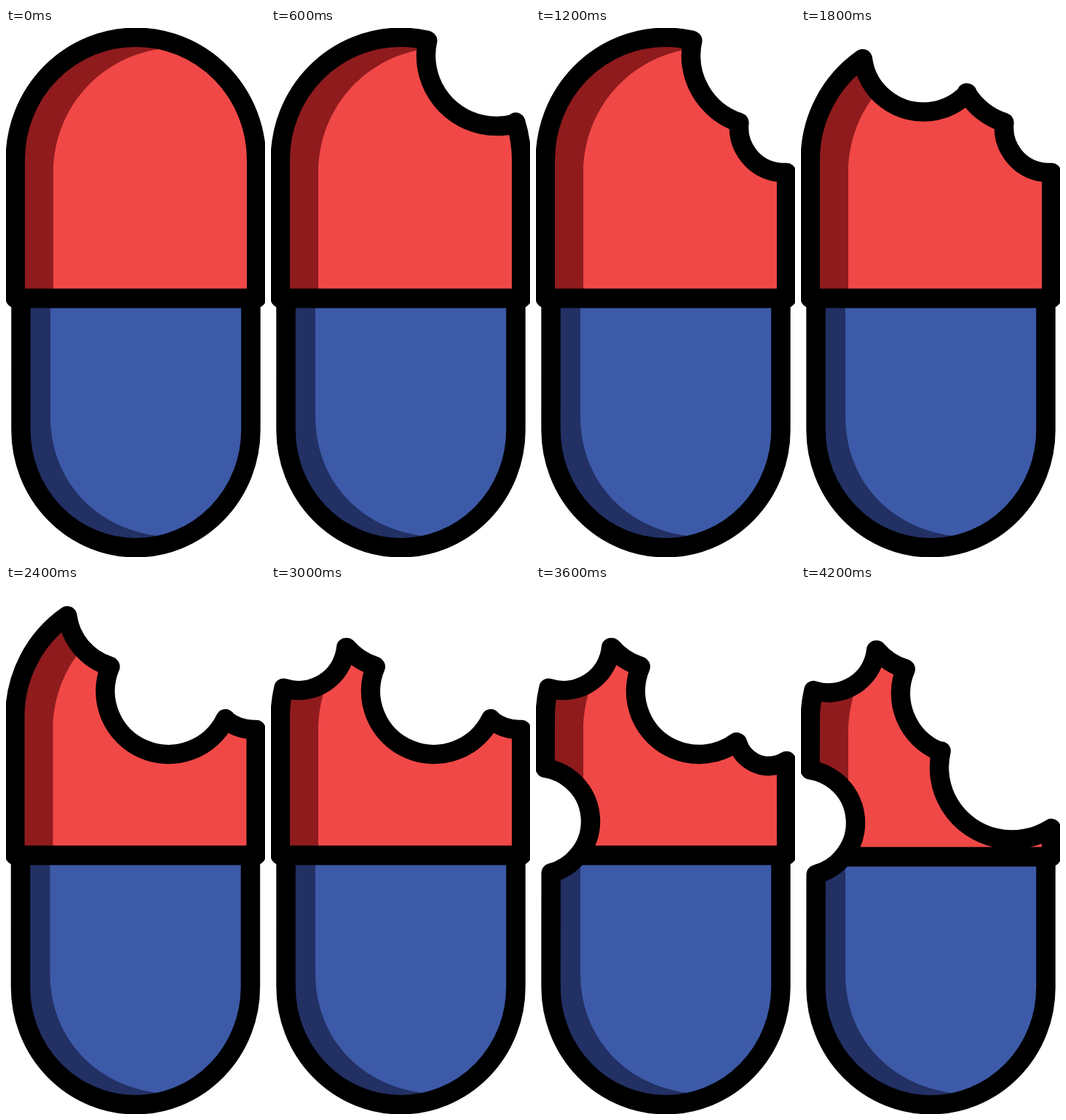
Recreate the animation shown at these times as an HTML page with a canvas. Size 356 by 728 pixels, loop 4.8 s.

```html
<!DOCTYPE html>
<html lang="en">
<head>
<meta charset="utf-8">
<title>Pill being eaten</title>
<style>
  html, body { margin: 0; width: 100%; height: 100%; overflow: hidden; background: #fff; }
  canvas { display: block; }
</style>
</head>
<body>
<canvas id="stage" width="356" height="728"></canvas>
<script>
const ctx = document.getElementById('stage').getContext('2d');
const STEP = 600;
const LINE = 26.5;
const BAND = 372;
const LEFT = 12.75, RIGHT = 344.25;
const CX = (LEFT + RIGHT) / 2, RX = (RIGHT - LEFT) / 2;
const DOME_Y = 181, DOME_RY = 168.25;

// Bite circles: x, y, radius
const shoulder = [310, 38, 97];
const side = [341, 137, 62];
const crown = [168, 31.7, 83.8];
const middle = [224, 146, 87];
const corner = [37.6, 79, 66];
const nibble = [320, 204, 45];
const deep = [290, 248.4, 100];
const waist = [1, 325, 74];

// Each top edge alternates tips and the bites between them
const left = [[18, 142], corner, [104, 86], crown, [143, 112], middle];
const right = [[304, 185], side, [RIGHT, 199]];
const shoulderEnd = [shoulder, [279, 130], side, [RIGHT, 199]];
const poses = [
  { top: [] },
  { top: [[214, 17], shoulder, [335, 130]] },
  { top: [[214, 17], ...shoulderEnd] },
  { top: [[85, 42.5], crown, [228, 89], ...shoulderEnd] },
  { top: [[85, 42.5], crown, [143, 112], middle, ...right], move: [1, -0.5, 0] },
  { top: [...left, ...right] },
  { top: [...left, [276, 217], nibble, [RIGHT, 242]], waist: true },
  { top: [...left, [190, 225], deep, [RIGHT, 333]], waist: true, move: [0.9945, 0, 4] }
];

const domeAngle = ([x, y]) => Math.atan2((y - DOME_Y) / DOME_RY, (x - CX) / RX);
const dome = (p, from, to) => p.ellipse(CX, DOME_Y, RX, DOME_RY, 0, from, to);

function bite(p, [cx, cy, r], a, b) {
  const angle = ([x, y]) => Math.atan2(y - cy, x - cx);
  p.arc(cx, cy, r, angle(a), angle(b), true);
}

const notch = [58, BAND];

function redPath({ top, waist: bitten }) {
  const p = new Path2D();
  p.moveTo(RIGHT, BAND);
  if (bitten) {
    p.lineTo(...notch);
    bite(p, waist, notch, [LEFT, 251]);
  } else {
    p.lineTo(LEFT, BAND);
  }
  dome(p, -Math.PI, top.length ? domeAngle(top[0]) : 0);
  for (let i = 1; i < top.length; i += 2) bite(p, top[i], top[i - 1], top[i + 1]);
  const end = top[top.length - 1];
  if (end && end[1] < DOME_Y) dome(p, domeAngle(end), 0);
  p.closePath();
  return p;
}

function bluePath({ waist: bitten }) {
  const p = new Path2D();
  p.moveTo(CX + 158, BAND);
  p.ellipse(CX, 553, 158, 162.25, 0, 0, Math.PI);
  if (bitten) bite(p, waist, [CX - 158, 396], notch);
  else p.lineTo(CX - 158, BAND);
  p.closePath();
  return p;
}

const redLight = new Path2D('M65 400V200C65 112 127 42 210 29V0H400V400Z');
const blueLight = new Path2D('M61 350V534C61 622 122 688 209 699V728H400V350Z');

function fillHalf(path, dark, light, lightPath) {
  ctx.save();
  ctx.clip(path);
  ctx.fillStyle = dark;
  ctx.fillRect(0, 0, 356, 728);
  ctx.fillStyle = light;
  ctx.fill(lightPath);
  ctx.restore();
}

function draw(pose) {
  const [scaleY, dx, dy] = pose.move || [1, 0, 0];
  const red = redPath(pose), blue = bluePath(pose);
  ctx.setTransform(1, 0, 0, 1, 0, 0);
  ctx.clearRect(0, 0, 356, 728);
  ctx.setTransform(1, 0, 0, scaleY, dx, dy);
  fillHalf(blue, '#223064', '#3d5aa8', blueLight);
  fillHalf(red, '#8f1b1d', '#f04847', redLight);
  ctx.lineWidth = LINE;
  ctx.lineJoin = 'round';
  ctx.strokeStyle = '#000';
  ctx.stroke(blue);
  ctx.stroke(red);
}

const start = performance.now();
let shown = -1;

function tick() {
  const i = Math.floor((performance.now() - start) / STEP) % poses.length;
  if (i !== shown) draw(poses[shown = i]);
  requestAnimationFrame(tick);
}
tick();
</script>
</body>
</html>
```
